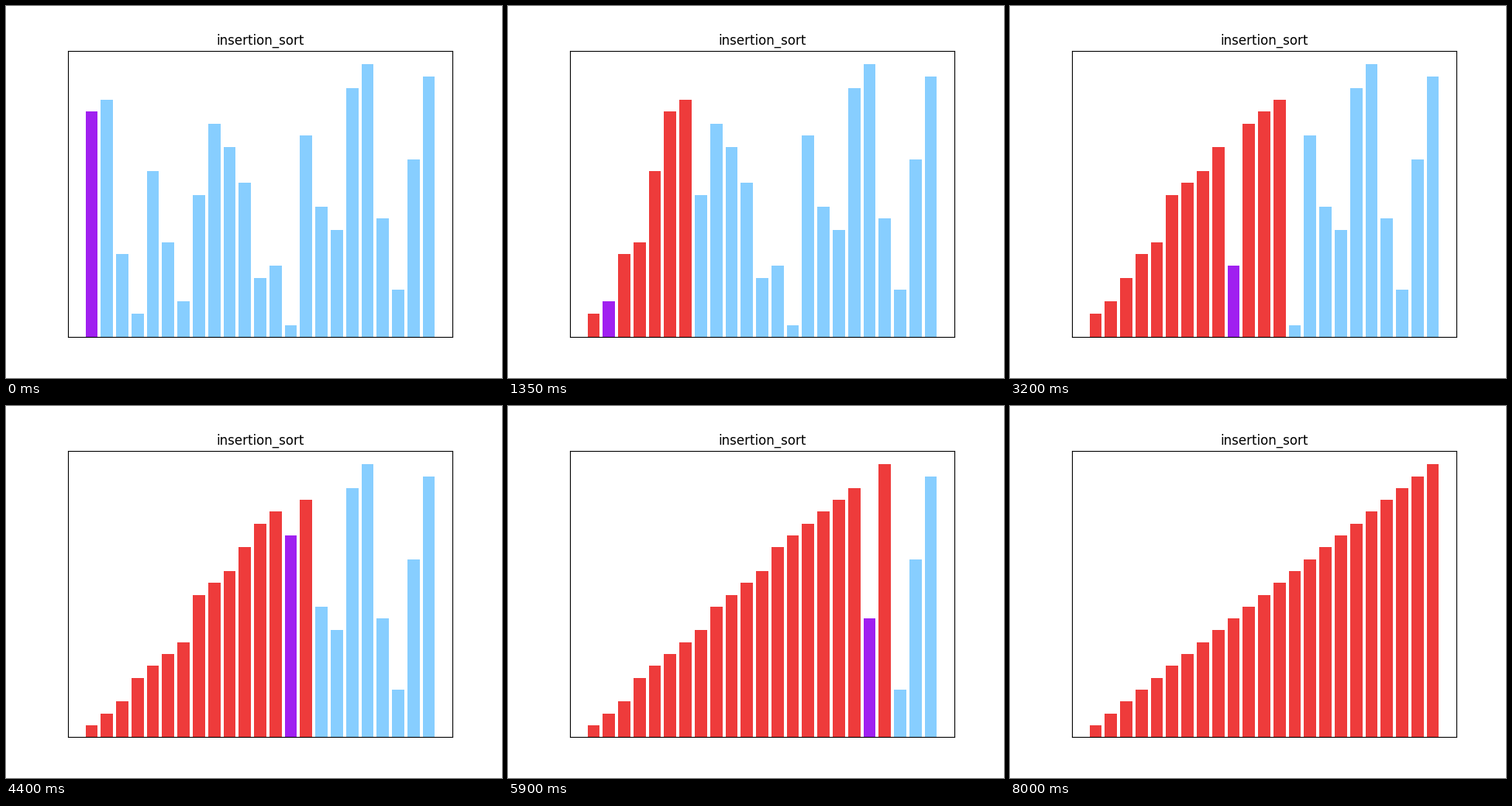
Recreate the animation shown at these times as a matplotlib script. Size 640 px wide and 480 px high, loop 8.05 s.

```python
import matplotlib.pyplot as plt
from matplotlib.animation import FuncAnimation

BLUE, RED, PURPLE = "#87CEFF", "#EE3B3B", "#A020F0"
VALUES = [19, 20, 7, 2, 14, 8, 3, 12, 18, 16, 13, 5,
          6, 1, 17, 11, 9, 21, 23, 10, 4, 15, 22]


def insertion_sort(values):
    """Yield (values, sorted count, active index) for every step."""
    a = list(values)
    for i in range(len(a)):
        j = i
        yield a[:], i + 1, j
        while j > 0 and a[j - 1] > a[j]:
            a[j - 1], a[j] = a[j], a[j - 1]
            j -= 1
            yield a[:], i + 1, j
        yield a[:], i + 1, None


steps = list(insertion_sort(VALUES))

fig, ax = plt.subplots(figsize=(6.4, 4.8), dpi=100)
bars = ax.bar(range(len(VALUES)), VALUES, width=0.8, color=BLUE)
ax.set_title("insertion_sort", fontname="DejaVu Sans", fontsize=12)
ax.set_xticks([])
ax.set_yticks([])


def update(frame):
    heights, done, active = steps[frame]
    for k, (bar, height) in enumerate(zip(bars, heights)):
        bar.set_height(height)
        bar.set_facecolor(PURPLE if k == active else RED if k < done else BLUE)
    return list(bars)


anim = FuncAnimation(fig, update, frames=len(steps), interval=50,
                     repeat=True, repeat_delay=0, blit=False)
plt.show()
```
